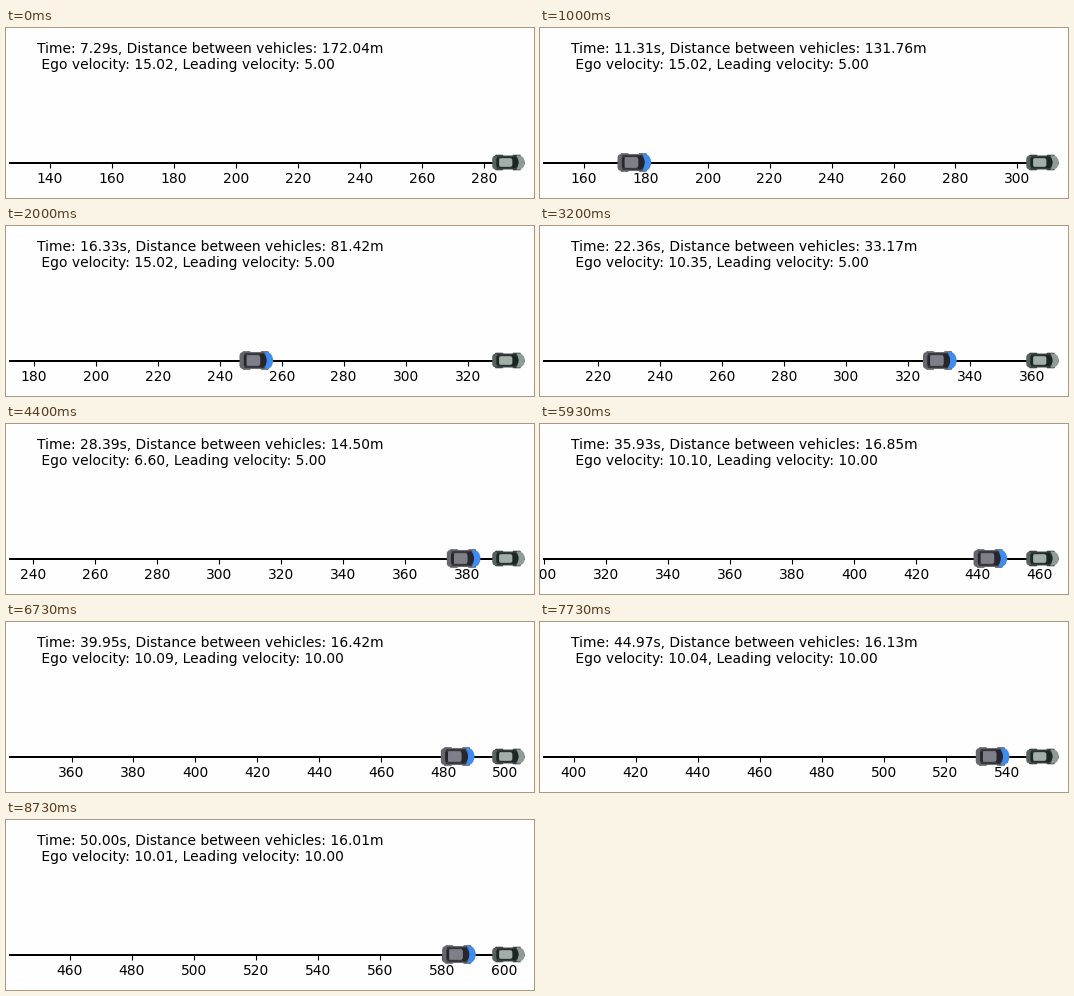
Animation, 528 px wide and 170 px high, one loop 8.79 s. Source, as a matplotlib script:

```python
import numpy as np
import matplotlib.pyplot as plt
from matplotlib.animation import FuncAnimation
from matplotlib.patches import Ellipse, FancyBboxPatch
from matplotlib.ticker import MultipleLocator
from matplotlib.transforms import Affine2D

plt.rcParams["font.family"] = "DejaVu Sans"

W, H, DPI = 528, 170, 100
LOOP, TICK = 8790, 30            # ms
DT = 50 / 199                    # simulation step, s
SCALE = 3.098                    # pixels per metre
LEAD_X, ROAD_Y = 502.4, 134.5    # leading car on screen
ROAD = (3.6, 518)
BRAKE, FOLLOW, SPEEDUP = 17.151, 22.362, 30


def lead_pos(t):
    return 251.52 + 5 * t + 5 * max(0, t - SPEEDUP)


def lead_vel(t):
    return 5 if t < SPEEDUP else 10


def closing_speed(t):
    """Cruise, brake evenly, settle behind, then catch up again."""
    s = t - SPEEDUP
    return np.select(
        [t < BRAKE, t < FOLLOW, t < SPEEDUP],
        [10.0185,
         10.0185 - 0.896 * (t - BRAKE),
         0.08 + 5.27 * np.exp(-0.2062 * (t - FOLLOW))],
        0.629 * np.exp(-0.19 * s) - 4.458 * np.exp(-0.641 * s))


# Gap between the cars: the closing speed summed up from the first picture
clock = np.linspace(29 * DT, 50, 50001)
speed = closing_speed(clock)
moved = np.cumsum((speed[1:] + speed[:-1]) / 2 * np.diff(clock))
gaps = 172.04 - np.append(0, moved)


def time_at(ms):
    """Pictures last 130 and 70 ms in turn; the start runs slower."""
    i = 2 * (ms // 200) + (ms % 200 >= 130)
    return DT * max(25 + 2 * i, 29 + i)


fig = plt.figure(figsize=(W / DPI, H / DPI), dpi=DPI, facecolor="#fefefe")

road = fig.add_axes([ROAD[0] / W, 35 / H, (ROAD[1] - ROAD[0]) / W, 0.6])
road.patch.set_visible(False)
road.spines[["left", "right", "top"]].set_visible(False)
road.spines["bottom"].set_linewidth(1.44)
road.xaxis.set_major_locator(MultipleLocator(20))
road.tick_params(axis="x", pad=2.8)
road.set_yticks([])

ax = fig.add_axes([0, 0, 1, 1])
ax.set(xlim=(0, W), ylim=(H, 0))
ax.axis("off")
lines = [ax.text(31, y, "", fontsize=10, va="baseline") for y in (25, 41)]


def box(x, length, width, color, y=0, r=2.0):
    """Rounded block centred on (x, y)."""
    return FancyBboxPatch((x - length / 2, y - width / 2), length, width,
                          boxstyle=f"round,pad=0,rounding_size={r}",
                          fc=color, ec="none")


def make_car(length, width, paint, nose, roof, dark):
    """Car seen from above, facing right."""
    sides = (-width / 2, width / 2)
    return [
        *[box(x * length, 8, 2, dark, 0.9 * y, 0.8)
          for x in (-0.28, 0.25) for y in sides],
        Ellipse((0.3 * length, 0), 0.4 * length, 0.96 * width, fc=nose),
        box(-0.1 * length, 0.78 * length, 0.94 * width, paint, r=4),
        *[box(-0.05 * length, 0.6 * length, 1.4, dark, 0.72 * y, 0.6)
          for y in sides],
        Ellipse((0.18 * length, 0), 0.26 * length, 0.76 * width, fc=dark),
        box(-0.32 * length, 3, 0.6 * width, dark, r=1),
        box(-0.08 * length, 0.4 * length, 0.56 * width, roof),
    ]


def place(car, x):
    move = Affine2D().translate(x, ROAD_Y) + ax.transData
    for part in car:
        part.set_transform(move)


ego = make_car(34, 18, "#66666e", "#3f8cf0", "#7f7f8a", "#26262b")
lead = make_car(33, 15, "#56625f", "#8f9b95", "#a3aea8", "#1c2625")
for part in ego + lead:
    ax.add_patch(part)
place(lead, LEAD_X)


def update(frame):
    t = time_at(frame * TICK + TICK - 1)
    gap = np.interp(t, clock, gaps)
    lead_v = lead_vel(t)
    v = lead_v + closing_speed(t)

    road.set_xlim(*(lead_pos(t) + (px - LEAD_X) / SCALE for px in ROAD))
    place(ego, LEAD_X - gap * SCALE)
    lines[0].set_text(f"Time: {t:.2f}s, Distance between vehicles: {gap:.2f}m")
    lines[1].set_text(f" Ego velocity: {v:.2f}, Leading velocity: {lead_v:.2f}")
    return [*lines, *ego]


anim = FuncAnimation(fig, update, frames=LOOP // TICK, interval=TICK,
                     repeat=True, repeat_delay=0, blit=False)
plt.show()
```
